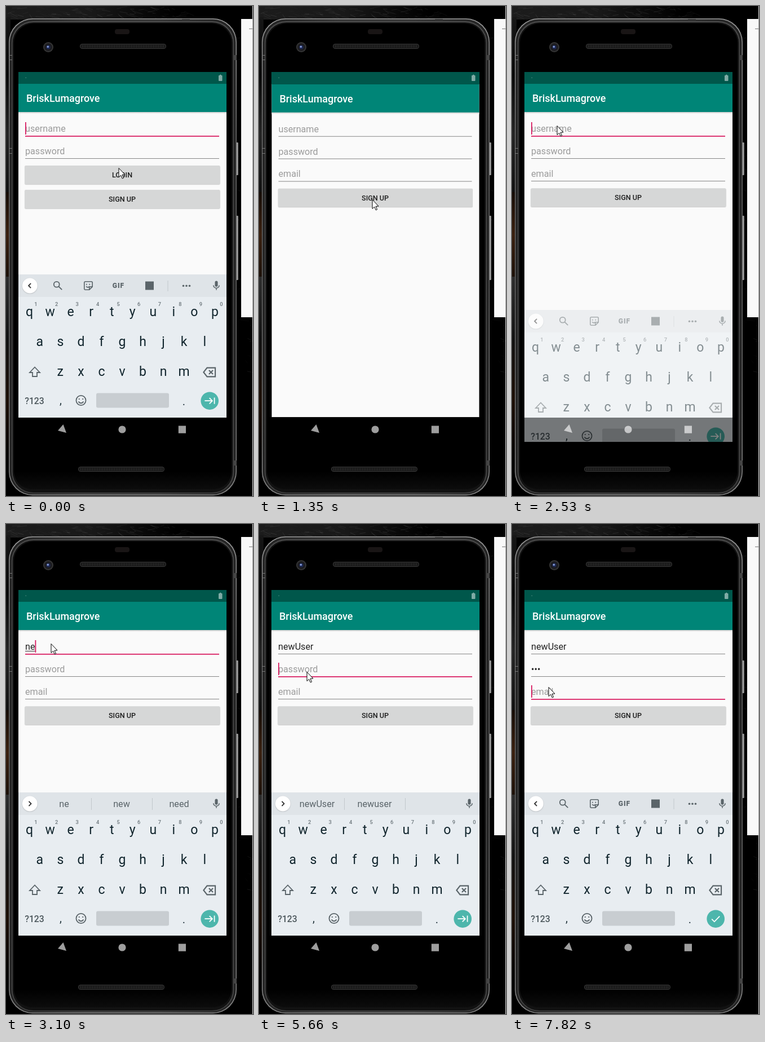
Animation of 438x869 px, one loop 8000 ms. Source, as an HTML page with a canvas:

```html
<!DOCTYPE html>
<html lang="en">
<head>
<meta charset="utf-8">
<title>Sign up</title>
<style>
html, body { margin: 0; width: 100%; height: 100%; overflow: hidden; background: #000; }
canvas { display: block; width: 438px; height: 869px; }
</style>
</head>
<body>
<canvas id="stage" width="438" height="869"></canvas>
<script>
const LOOP = 8000, PINK = '#d81b60', GREY = '#5a6469', INK = 'rgba(0,0,0,.87)';
const stage = document.getElementById('stage').getContext('2d');
let g = stage;

// Tracks are [start, value] steps; the last one already begun is shown.
const at = (track, t) => track.findLast(s => s[0] <= t)[1];
const mouse = [
  [0, [199.5, 287]], [150, [203, 300]], [300, [204, 318]], [420, [202, 335]], [540, [200.5, 343]],
  [1870, [134, 282]], [2020, [101, 240]], [2140, [81, 217]], [2290, [79.5, 212]],
  [5000, [80, 217]], [5120, [81, 227]], [5270, [83, 241]], [5390, [84, 255]], [5510, [84.5, 262]],
  [7010, [80, 270]], [7130, [74, 278]], [7280, [68, 285]], [7400, [64.5, 289]]
];
const user = [[0, ''], [2950, 'n'], [3100, 'ne'], [3220, 'new'], [3780, 'newU'],
  [4180, 'newUs'], [4330, 'newUse'], [4450, 'newUser']];
const secret = [[0, ''], [6060, '1'], [6340, '•2'], [6460, '••3'], [7550, '•••']];
const focus = [[0, 0], [1200, -1], [2410, 0], [5510, 1], [7550, 2]];
const caret = [[0, 1], [150, 0], [540, 1], [5000, 0], [5270, 1], [7010, 0], [7550, 1]];
const zoom = [[0, 1], [1200, .976], [1350, .997], [1470, 1]];
const press = [[0, 0], [690, .4], [810, .7], [930, 1], [1200, 0]];
const keyboard = [[0, [0, 1]], [1200, [23, .7]], [1350, null], [2530, [63, .5]], [2680, [0, 1]]];
const strip = [[0, 'tools'], [3100, ['ne', 'new', 'need']], [3220, ['new', 'New', 'news']],
  [3900, ['newU', 'newu', 'news']], [4180, ['newUs', 'newus', 'Menus']],
  [4330, ['newUse', 'newuse', '']], [4450, ['newUser', 'newuser', '']],
  [5810, 'digits'], [7670, 'empty'], [7820, 'tools']];

const icons = {
  search: 'M15 9.5a5.5 5.5 0 1 1-11 0a5.5 5.5 0 1 1 11 0M13.8 13.8L20 20',
  sticker: 'M6 4H18a2 2 0 0 1 2 2V14L14 20H6a2 2 0 0 1-2-2V6a2 2 0 0 1 2-2M20 14h-4a2 2 0 0 0-2 2v4M8.5 8.5v2M14.5 8.5v2M8 13c1 3 5 3 6 0',
  shift: 'M12 3.5L3 13H8V20H16V13H21Z',
  erase: 'M8 5H21V19H8L2.5 12ZM11 8.8l6.4 6.4M17.4 8.8l-6.4 6.4',
  smile: 'M21 12a9 9 0 1 1-18 0a9 9 0 1 1 18 0M7.5 14c1.5 4 7.5 4 9 0M8.6 8.4v2M15.4 8.4v2',
  next: 'M2.5 12H17M11.5 6.5L17 12L11.5 17.5M21 6V18',
  check: 'M4.5 12.5L9.5 17.5L19.5 7',
  left: 'M14 7.5L9.5 12L14 16.5',
  right: 'M10 7.5L14.5 12L10 16.5',
  mic: 'M6 11a6 6 0 0 0 12 0M12 17v4',
  micHead: 'M12 5v6'
};
for (const k in icons) icons[k] = new Path2D(icons[k]);

function rect(x, y, w, h, fill, r = 0) {
  g.fillStyle = fill;
  g.beginPath();
  g.roundRect(x, y, w, h, r);
  g.fill();
}
function disc(x, y, r, fill) {
  rect(x - r, y - r, 2 * r, 2 * r, fill, r);
}
function poly(points, fill) {
  g.beginPath();
  for (const [x, y] of points) g.lineTo(x, y);
  g.closePath();
  g.fillStyle = fill;
  g.fill();
}
function text(s, x, y, size, fill, weight = 400, align = 'center') {
  g.font = `${weight} ${size}px Roboto, sans-serif`;
  g.textAlign = align;
  g.fillStyle = fill;
  g.fillText(s, x, y);
}
function icon(name, x, y, color = GREY, width = 2, size = .9) {
  g.save();
  g.translate(x, y);
  g.scale(size, size);
  g.translate(-12, -12);
  g.strokeStyle = color;
  g.lineWidth = width;
  g.lineCap = name === 'micHead' ? 'round' : 'butt';
  g.stroke(icons[name]);
  g.restore();
}
function gradient(x0, y0, x1, y1, ...colors) {
  const fill = g.createLinearGradient(x0, y0, x1, y1);
  colors.forEach((c, i) => fill.addColorStop(i / (colors.length - 1), c));
  return fill;
}

function newLayer() {
  const canvas = document.createElement('canvas');
  canvas.width = 438;
  canvas.height = 869;
  return canvas.getContext('2d');
}
function drawOn(layer, draw) {
  g = layer;
  g.clearRect(0, 0, 438, 869);
  draw();
  g = stage;
}

function speaker(x, y) {
  rect(x, y, 153, 9, '#3a3a3a', 4.5);
  rect(x + 1, y + 1, 151, 7, '#171717', 3.5);
  for (let i = 4; i < 149; i += 3) rect(x + i, y + 2, 1, 5, '#303030');
}

function drawPhone() {
  rect(0, 0, 438, 869, '#000');
  // Dim wallpaper strands
  let seed = 7;
  const rnd = () => (seed = seed * 16807 % 2147483647) / 2147483647;
  rect(0, 0, 300, 24, gradient(0, 0, 300, 0, '#1c1c1c', '#191919', '#000'));
  rect(0, 20, 8, 310, gradient(0, 20, 0, 330, '#161616', '#080808', '#242424', '#101010'));
  rect(0, 330, 8, 150, gradient(0, 330, 0, 480, '#150c06', '#3a200f', '#1c1008'));
  rect(0, 480, 8, 330, gradient(0, 480, 0, 810, '#2d2d2d', '#111', '#1c0e05', '#000'));
  g.lineWidth = .7;
  for (let i = 0; i < 170; i++) {
    const top = i < 110, x = top ? rnd() * 320 : 408 + rnd() * 28, y = top ? rnd() * 22 : 20 + rnd() * 640;
    g.strokeStyle = `rgba(170,170,170,${rnd() * .22})`;
    g.beginPath();
    g.moveTo(x, y);
    g.lineTo(x + 4 + rnd() * 14, y + rnd() * 12 - 4);
    g.stroke();
  }
  // Window behind the phone
  rect(417, 23, 21, 529, '#f9f9f9');
  rect(431, 40, 6, 1, '#777');
  rect(437, 0, 1, 869, '#ddd');
  rect(437, 23, 1, 529, '#999');
  // Side buttons
  for (const [y, h] of [[242, 58], [372, 114]]) {
    rect(406, y, 6, h, gradient(406, 0, 412, 0, '#444', '#bbb', '#666'), 1);
  }
  rect(406, 603, 3, 42, '#444');
  // Body and glass
  rect(5, 22, 404, 846, gradient(0, 22, 0, 868, '#999', '#6a6a6a', '#606060', '#6a6a6a', '#888'), 42);
  rect(6.5, 23.5, 401, 843, gradient(6, 0, 408, 0, '#222', '#383838', '#383838', '#222'), 41);
  rect(10, 27, 394, 837, '#4c4c4c', 38);
  rect(11.5, 29, 391, 834, '#121212', 37);
  rect(14, 31, 386, 826, '#000', 35);
  rect(14, 825, 386, 32, gradient(0, 825, 0, 857, '#000', '#0c0c0c'), [0, 0, 35, 35]);
  for (const y of [87, 95, 252, 261]) rect(5, y, 6, 1, '#777');
  rect(403, 87, 6, 9, '#444');
  rect(403, 806, 6, 9, '#444');
  rect(312, 23, 14, 4, '#333');
  rect(193, 41, 26, 9, '#191515', 4);
  disc(75, 73, 9, '#353535');
  disc(75, 73, 7, '#1c1c20');
  disc(75, 73, 3.6, '#1d2855');
  disc(74.3, 72.3, 1.7, '#8ba0d8');
  speaker(131, 67);
  speaker(128, 817);
}

function button(label, y, h, lift) {
  g.save();
  g.shadowColor = `rgba(0,0,0,${.2 + lift * .2})`;
  g.shadowBlur = 1 + lift * 3;
  g.shadowOffsetY = .6 + lift;
  rect(33.3, y, 346.2, h, '#d6d7d7', 2);
  g.restore();
  text(label, 206, y + h / 2 + 4.5, 12.57, INK, 500);
}

function field(hint, value, line, active, caretOn, composing) {
  text(value || hint, 34, line - 7, 16.16, value ? INK : '#9b9b9b', 400, 'left');
  const w = value ? g.measureText(value).width : 0;
  if (composing) rect(34, line - 5, w, 1, '#333');
  rect(34, line, 344, active ? 1.7 : 1, active ? PINK : '#868686');
  if (active && caretOn) rect(34 + w, line - 24, 1.8, 22, PINK);
}

function page(signUp, t) {
  const active = at(focus, t), on = at(caret, t), name = signUp ? at(user, t) : '';
  const shown = i => signUp ? active === i : i === 0;
  rect(22, 117, 369, 613, '#fafafa');
  rect(22, 730, 369, 43, '#000');
  rect(22, 188, 369, 3, gradient(0, 188, 0, 191, '#c8c8c8', '#fafafa'));
  rect(22, 117, 369, 71, '#008577');
  rect(22, 117, 369, 21, '#00574b');
  text('BriskLumagrove', 36, 170, 17.97, '#fff', 500, 'left');
  field('username', name, 230, shown(0), on, name && active === 0);
  field('password', signUp ? at(secret, t) : '', 270, signUp && shown(1), on);
  if (signUp) {
    field('email', '', 310, shown(2), on);
    button('SIGN UP', 323.3, 33, at(press, t));
  } else {
    button('LOGIN', 283, 33.5, 0);
    button('SIGN UP', 326, 33.5, at(press, t));
  }
}

function drawStrip(mode) {
  rect(22, 476, 369, 40, '#dfe4e8');
  if (mode === 'digits') {
    [...'1234567890'].forEach((d, i) => text(d, 41.5 + i * 36.55, 504, 22, '#10242c'));
    return;
  }
  g.save();
  g.shadowColor = 'rgba(0,0,0,.2)';
  g.shadowBlur = 2;
  g.shadowOffsetY = .7;
  disc(42.3, 496, 13.4, '#fff');
  g.restore();
  icon(mode === 'tools' ? 'left' : 'right', 42.3, 496, '#333');
  icon('mic', 373, 496, GREY, 1.8, .85);
  icon('micHead', 373, 496, GREY, 6, .85);
  if (mode === 'tools') {
    icon('search', 92, 496);
    icon('sticker', 146, 496, GREY, 1.8);
    g.letterSpacing = '1px';
    text('GIF', 199.5, 500.3, 12, GREY, 900);
    g.letterSpacing = '0px';
    rect(247, 488.5, 15, 15, GREY);
    rect(286.5, 487, 1, 19, '#c2c8cc');
    for (const x of [314.5, 320, 325.5]) disc(x, 496.3, 1.8, GREY);
  } else if (Array.isArray(mode)) {
    mode.forEach((word, i) => text(word, 103 + i * 102, 502.3, 16.16, GREY));
    for (const x of [151, 259]) rect(x, 486, 1, 21, '#c2c8cc');
  }
}

function drawKeyboard(t) {
  const mode = at(strip, t), digits = mode === 'digits';
  rect(22, 516, 369, 214, '#e8edf1');
  drawStrip(mode);
  [['qwertyuiop', 41.5], ['asdfghjkl', 59.8], ['zxcvbnm', 96.3]].forEach(([row, x], r) => {
    [...row].forEach((key, i) => {
      text(key, x + i * 36.55, 549.5 + r * 53.2, 23, '#10242c');
      if (!r && !digits) text((i + 1) % 10, x + 11.5 + i * 36.55, 532, 9.3, '#6b757a', 500);
    });
  });
  icon('shift', 51, 649, GREY, 1.8, 1);
  icon('erase', 361, 649.5, GREY, 1.9, 1.12);
  text('?123', 50.5, 705.5, 15.8, '#4c575c', 500);
  text(',', 97, 706, 20, '#26373e');
  text('.', 315.5, 708, 20, '#26373e');
  if (!digits) icon('smile', 133, 699.5, GREY, 1.9, .95);
  const left = digits ? 124 : 160;
  rect(left, 686.5, 289 - left, 26, '#c8cdd1', 3);
  disc(361.2, 700.2, 15.8, '#4db6ac');
  icon(t >= 7670 ? 'check' : 'next', 361.2, 700.2, '#fff', 1.9, .93);
}

function drawNav() {
  const fill = 'rgba(255,255,255,.62)';
  poly([[101.5, 742], [107, 757], [92, 753]], fill);
  disc(206, 751, 6.6, fill);
  rect(305.8, 744.5, 13.2, 13.2, fill);
}

function drawMouse([x, y]) {
  g.save();
  g.translate(x + .5, y + .5);
  poly([[0, 0], [0, 16], [3.7, 12.7], [6.3, 18.5], [8.6, 17.4], [6, 11.8], [11, 11.5]], '#fff');
  g.strokeStyle = '#000';
  g.lineWidth = 1;
  g.stroke();
  g.restore();
}

const phone = newLayer(), keys = newLayer();
drawOn(phone, drawPhone);

function render(t) {
  g.drawImage(phone.canvas, 0, 0);
  g.save();
  g.beginPath();
  g.rect(22, 117, 369, 656);
  g.clip();
  if (t < 1350) page(false, t);
  if (t >= 1200) {
    // The new page grows from the middle of the screen
    const scale = at(zoom, t);
    g.save();
    g.globalAlpha = t < 1350 ? .85 : 1;
    g.translate(206.5, 445);
    g.scale(scale, scale);
    g.translate(-206.5, -445);
    page(true, t);
    g.restore();
  }
  rect(22, 117, 369, 21, '#00574b');
  rect(34.5, 126.5, 1.5, 1.5, '#3f8178');
  rect(377, 123, 6.5, 10, '#80aba5', 1);
  rect(379, 121.8, 2.5, 2, '#80aba5');

  const pose = at(keyboard, t);
  if (pose) {
    drawOn(keys, () => drawKeyboard(t));
    g.globalAlpha = pose[1];
    g.drawImage(keys.canvas, 0, pose[0]);
    g.globalAlpha = 1;
  }
  drawNav();
  g.restore();
  drawMouse(at(mouse, t));
}

const start = performance.now();
function tick() {
  render((performance.now() - start) % LOOP);
  requestAnimationFrame(tick);
}
tick();
</script>
</body>
</html>
```
